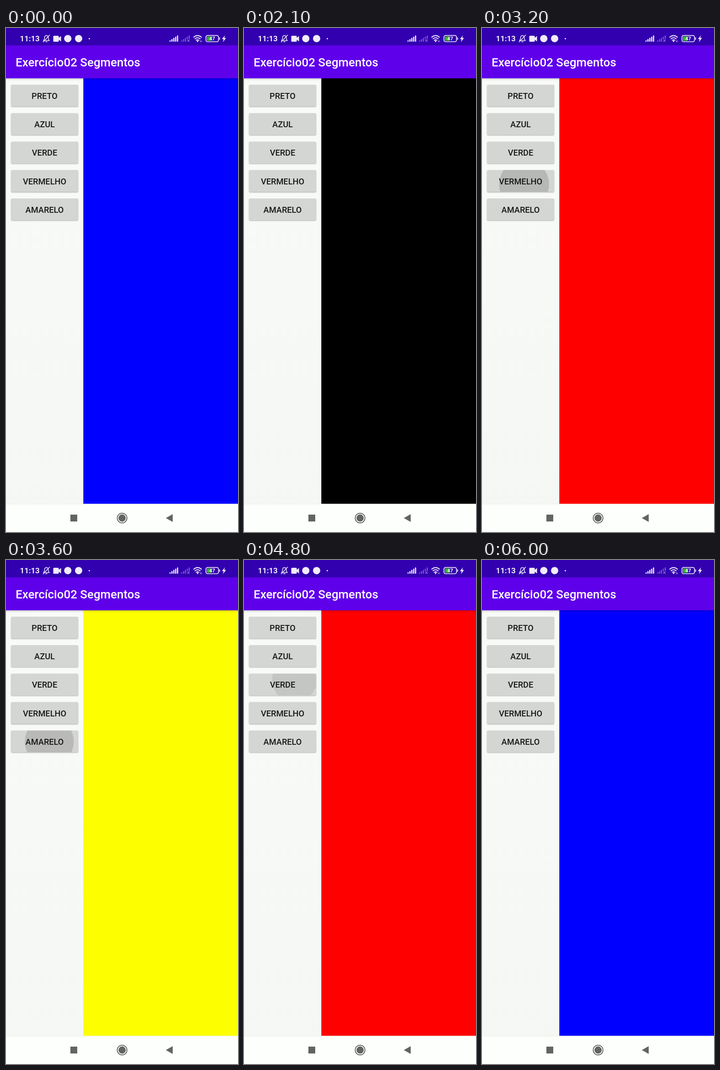
An HTML page that plays this animation: 508 px wide and 1102 px high, repeating every 6100 ms.

```html
<!DOCTYPE html>
<html lang="pt">
<head>
<meta charset="utf-8">
<title>Exercício02 Segmentos</title>
<style>
  html, body { margin: 0; width: 100%; height: 100%; overflow: hidden; background: #f8faf7; }
  svg { display: block; width: 100vw; height: 100vh; }
  text { font-family: Roboto, sans-serif; font-weight: 500; }
</style>
</head>
<body>
<svg viewBox="0 0 508 1102" xmlns="http://www.w3.org/2000/svg">
  <defs>
    <linearGradient id="page" x2="0" y2="1">
      <stop offset="0" stop-color="#f9fbf8"/>
      <stop offset="1" stop-color="#f5f7f4"/>
    </linearGradient>
    <linearGradient id="shade" x2="0" y2="1">
      <stop offset="0" stop-opacity=".16"/>
      <stop offset="1" stop-opacity="0"/>
    </linearGradient>
    <filter id="soft" x="-10%" y="-20%" width="120%" height="150%">
      <feGaussianBlur stdDeviation="1.2"/>
    </filter>
  </defs>

  <rect width="508" height="1102" fill="url(#page)"/>
  <rect id="panel" x="169.3" y="110" width="338.7" height="931" fill="#00f"/>
  <rect y="110" width="508" height="5" fill="url(#shade)"/>
  <g id="buttons"></g>

  <rect width="508" height="38" fill="#3200af"/>
  <rect y="38" width="508" height="72" fill="#5f00ea"/>
  <text x="21" y="84" font-size="25.9" fill="#fff">Exercício02 Segmentos</text>

  <g fill="#f1ecfa">
    <text x="30.5" y="29.3" font-size="16.8" style="font-weight:700">11:13</text>
    <g fill="none" stroke="#f1ecfa" stroke-width="1.5" stroke-linecap="round" stroke-linejoin="round">
      <path d="M82 27.500 Q84.500 25.500 84.500 20.500 Q85 16.500 88.500 16.500 Q92 16.500 92.500 20.500 Q92.500 25.500 95 27.500 Z M87 30 H90 M81.500 30.500 L95.500 15.500"/>
    </g>
    <path d="M105 17 H114 Q115.500 17 115.500 18.500 V21.500 L120.500 17.500 V29.500 L115.500 25.500 V28.500 Q115.500 30 114 30 H105 Q103.500 30 103.500 28.500 V18.500 Q103.500 17 105 17 Z"/>
    <circle cx="135.300" cy="23.200" r="8"/>
    <circle cx="159" cy="23.200" r="8"/>
    <circle cx="182.500" cy="23.300" r="1.500"/>
  </g>

  <g id="signal" fill="#f1ecfa"></g>
  <path d="M397 25 l5 5 m0 -5 l-5 5" stroke="#8f72d0" stroke-width="1.3"/>
  <g fill="none" stroke="#f1ecfa" stroke-width="2">
    <path d="M410.500 20.500 Q419.500 12.500 428.500 20.500 M413.300 24 Q419.500 18.500 425.700 24 M416 27.200 Q419.500 24.300 423 27.200"/>
  </g>
  <circle cx="419.500" cy="29" r="1.700" fill="#f1ecfa"/>
  <path d="M425.500 27 v4 M428 27 v4" stroke="#c9b8ea" stroke-width="1"/>
  <rect x="440" y="18.500" width="10" height="9.500" rx="1" fill="#35b332"/>
  <rect x="437.800" y="16.300" width="27.500" height="13.700" rx="3.500" fill="none" stroke="#f1ecfa" stroke-width="1.700"/>
  <rect x="466.700" y="20.500" width="1.800" height="5.500" rx=".8" fill="#f1ecfa"/>
  <text x="451.600" y="27.300" font-size="11" text-anchor="middle" fill="#fff" style="font-weight:700">47</text>
  <path d="M479.500 16 L472.800 24.300 H476.500 L475 30.700 L481.800 21.800 H477.800 Z" fill="#f1ecfa"/>

  <rect y="1040.500" width="508" height="61.500" fill="#fdfffc"/>
  <rect y="1040.500" width="508" height="1" fill="#e9ebe8"/>
  <g fill="#626461">
    <rect x="141" y="1064" width="15" height="15"/>
    <circle cx="254.200" cy="1071.500" r="7.900"/>
    <circle cx="254.200" cy="1071.500" r="10.700" fill="none" stroke="#626461" stroke-width="1.800"/>
    <path d="M350 1071.500 L365 1063 V1080 Z"/>
  </g>
</svg>
<script>
const NS = 'http://www.w3.org/2000/svg';
const $ = id => document.getElementById(id);
const LOOP = 6100, STEP = 100;
const LEFT = 11, WIDTH = 147, HEIGHT = 47.5, MID = LEFT + WIDTH / 2;
const rowTop = row => 124 + row * 62.2;

const COLORS = [
  ['PRETO', '#000'],
  ['AZUL', '#00f'],
  ['VERDE', '#0f0'],
  ['VERMELHO', '#f00'],
  ['AMARELO', '#fdff00']
];

// Taps: button row, press time, panel switch time, touch x and y inside the row
const TAPS = [
  [0, 1665, 1700, 98, 26],
  [1, 2365, 2400, 100, 24],
  [2, 2789, 2900, 103, 20],
  [3, 3162, 3200, 95, 34],
  [4, 3565, 3600, 98, 24],
  [3, 4365, 4400, 100, 24],
  [2, 4780, 4900, 113, 13],
  [1, 5065, 5100, 104, 24]
].map(([row, press, change, x, y]) => ({ row, press, change, x, y }));

function add(parent, tag, attrs) {
  const el = document.createElementNS(NS, tag);
  for (const key in attrs) el.setAttribute(key, attrs[key]);
  return parent.appendChild(el);
}

const ripples = COLORS.map(([label], row) => {
  const box = { x: LEFT, y: rowTop(row), width: WIDTH, height: HEIGHT, rx: 2.5 };
  const clip = add($('buttons'), 'clipPath', { id: 'clip' + row });
  add(clip, 'rect', box);
  add($('buttons'), 'rect', { ...box, y: box.y + 1.3, opacity: .28, filter: 'url(#soft)' });
  add($('buttons'), 'rect', { ...box, fill: '#d4d6d3' });
  const group = add($('buttons'), 'g', { 'clip-path': `url(#clip${row})` });
  const circle = add(group, 'circle', { opacity: 0 });
  const text = add($('buttons'), 'text', {
    x: MID, y: box.y + 30.9, 'font-size': 18.2, 'text-anchor': 'middle', fill: '#171817'
  });
  text.textContent = label;
  return circle;
});

function bars(x, count, fill) {
  for (let i = 0; i < count; i++) {
    const h = 3 + i * 2.7;
    add($('signal'), 'rect', { x: x + i * 4.1, y: 30 - h, width: 2.6, height: h, rx: 1, fill });
  }
}
bars(358, 5, '#f1ecfa');
bars(383.5, 3, '#7654c8');
add($('signal'), 'rect', { x: 395.8, y: 18.9, width: 2.6, height: 5, rx: 1, fill: '#7654c8' });
add($('signal'), 'rect', { x: 399.9, y: 16.2, width: 2.6, height: 7.5, rx: 1, fill: '#7654c8' });

const clamp = v => Math.min(1, Math.max(0, v));

function render(time) {
  const t = Math.floor(time % LOOP / STEP) * STEP;
  let color = COLORS[1][1];
  ripples.forEach(c => c.setAttribute('opacity', 0));
  for (const tap of TAPS) {
    if (t >= tap.change) color = COLORS[tap.row][1];
    const age = t - tap.press;
    if (age < 0 || age > 190) continue;
    const p = clamp(age / 112);
    const grow = p * p * (3 - 2 * p);
    const cy = tap.y + (HEIGHT / 2 - tap.y) * grow;
    const circle = ripples[tap.row];
    circle.setAttribute('cx', tap.x + (MID - tap.x) * grow);
    circle.setAttribute('cy', rowTop(tap.row) + cy);
    circle.setAttribute('r', 46.5 + 30.5 * grow);
    circle.setAttribute('opacity', .14 * clamp(age / 38) * clamp((190 - age) / 78));
  }
  $('panel').setAttribute('fill', color);
}

const start = performance.now();
function tick() {
  render(performance.now() - start);
  requestAnimationFrame(tick);
}
tick();
</script>
</body>
</html>
```
